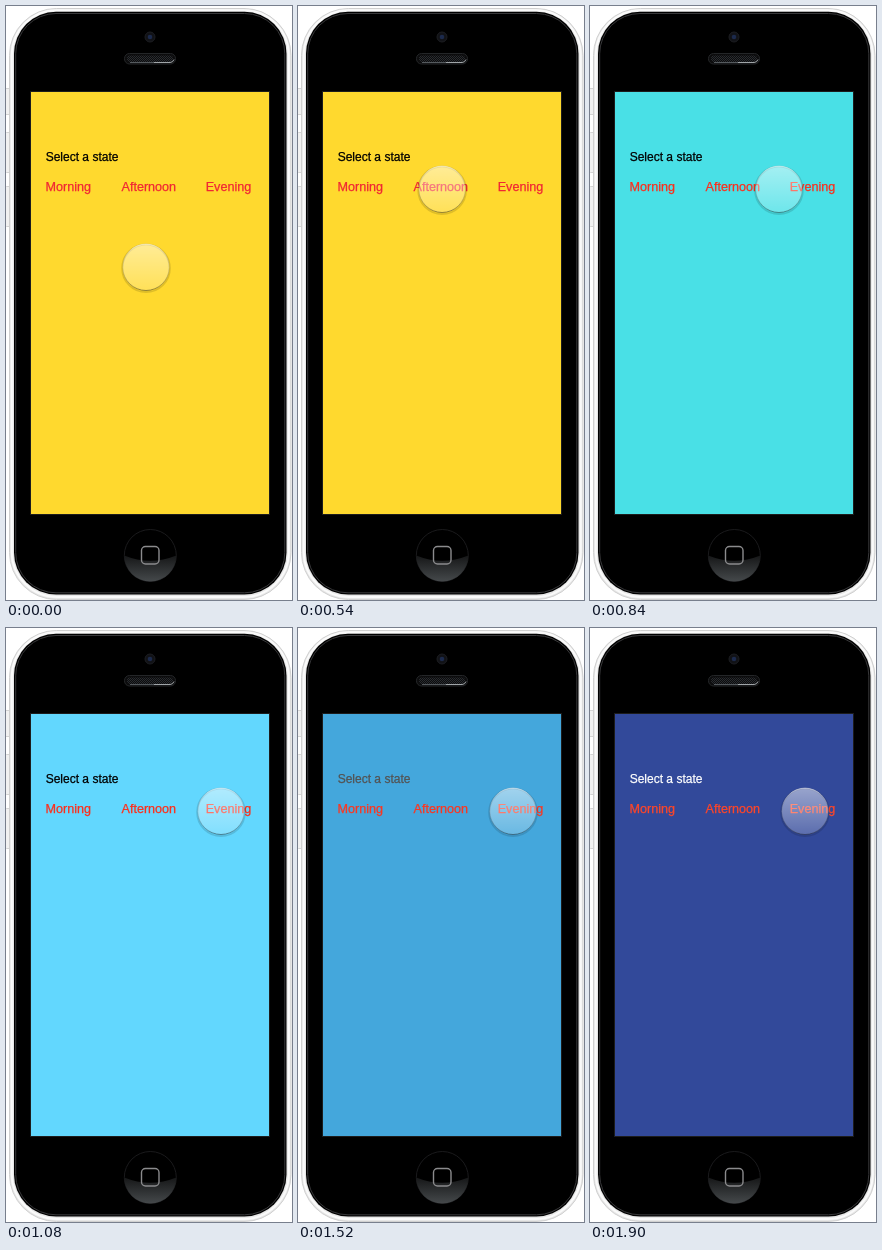
These frames come from a looping animation (286 by 594 pixels, 1.92 s). An HTML page:

```html
<!DOCTYPE html>
<html>
<head>
<meta charset="utf-8">
<style>
html, body { margin: 0; width: 100%; height: 100%; overflow: hidden; background: #fff; }
svg { display: block; width: 286px; height: 594px; }
text { font-family: "Liberation Sans", Arial, sans-serif; }
#label, #states { stroke: currentColor; fill: currentColor; stroke-width: .25px; }
</style>
</head>
<body>
<svg viewBox="0 0 286 594">
  <defs>
    <linearGradient id="glass" x2="0" y2="1">
      <stop stop-color="#fff" stop-opacity=".5"/>
      <stop offset="1" stop-color="#fff" stop-opacity=".2"/>
    </linearGradient>
    <linearGradient id="edge" x2="0" y2="1">
      <stop stop-color="#fff" stop-opacity=".5"/>
      <stop offset=".5" stop-color="#888" stop-opacity=".2"/>
      <stop offset="1" stop-color="#222" stop-opacity=".5"/>
    </linearGradient>
    <linearGradient id="gloss" x2="0" y2="1">
      <stop stop-color="#161718"/>
      <stop offset="1" stop-color="#45494b"/>
    </linearGradient>
    <pattern id="mesh" width="2" height="2" patternUnits="userSpaceOnUse">
      <path d="M0 0h1v1H0zM1 1h1v1H1z" fill="#292c30"/>
    </pattern>
  </defs>

  <g fill="#f1f1f1" stroke="#d4d4d4">
    <rect x="-1" y="82.5" width="5" height="26"/>
    <rect x="-.5" y="126.5" width="5" height="40" rx="1"/>
    <rect x="-.5" y="180.5" width="5" height="40" rx="1"/>
  </g>
  <rect x="3.5" y="2.5" width="281.5" height="591" rx="47" fill="#e6e6e6" stroke="#d0d0d0"/>
  <rect x="5.8" y="4.2" width="277" height="586.8" rx="45" fill="none" stroke="#fafafa" stroke-width="2"/>
  <rect x="8" y="5.8" width="272.5" height="582.7" rx="42"/>
  <rect x="9.7" y="7.5" width="269.1" height="579.3" rx="40.3" fill="none" stroke="#38383a"/>

  <circle cx="144" cy="31" r="5" fill="#111216" stroke="#1d1e22"/>
  <circle cx="144" cy="31" r="2.3" fill="#1c2a4c"/>
  <rect x="118.5" y="47.5" width="51" height="10.5" rx="5" fill="#0c0c0d" stroke="#242628"/>
  <rect x="121" y="49.5" width="46" height="6.5" rx="3" fill="url(#mesh)"/>
  <path d="M124 56.5h40" stroke="#555a5e"/>
  <path d="M148 56.5h16q3 0 4-3" fill="none" stroke="#a0a5a8"/>

  <circle cx="144.3" cy="549.5" r="26" stroke="#1a1a1c"/>
  <path d="M118.3 549.5Q144 560 170.3 549.5A26 26 0 0 1 118.3 549.5" fill="url(#gloss)"/>
  <rect x="135.5" y="540.5" width="17.5" height="17.5" rx="4" fill="none" stroke="#8b8b8d" stroke-width="1.4"/>

  <rect x="24.5" y="85.5" width="239" height="423" fill="none" stroke="#1c1c1c"/>
  <rect id="screen" x="25" y="86" width="238" height="422"/>
  <text id="label" x="39.7" y="155" font-size="12">Select a state</text>
  <g id="states" font-size="12.6">
    <text x="39.5" y="185">Morning</text>
    <text x="115.5" y="185">Afternoon</text>
    <text x="199.7" y="185">Evening</text>
  </g>
  <g id="touch">
    <circle cy="1" r="23.8" fill="none" stroke="#000" stroke-opacity=".13" stroke-width="2"/>
    <circle r="23.2" fill="url(#glass)" stroke="url(#edge)"/>
  </g>
</svg>
<script>
const LOOP = 1920, TAP_NOON = 540, TAP_NIGHT = 1436, FADE = 400;
// progress (one unit per state change), hue, saturation, lightness
const SKY = [
  [0, 49, 100, 59], [.68, 151, 86, 58], [.96, 182, 75, 59],
  [1, 195, 99, 69], [1.3, 200, 69, 57], [2, 227, 51, 40]
];
const el = id => document.getElementById(id);
const lerp = (a, b, p) => a + (b - a) * p;
const span = (t, from, to) => Math.min(1, Math.max(0, (t - from) / (to - from)));
const inOut = u => u < .5 ? 2 * u * u : 1 - 2 * (1 - u) ** 2;

// cubic-bezier(.25, .1, .25, 1)
function ease(x) {
  let lo = 0, hi = 1, s = .5;
  for (let i = 0; i < 20; i++) {
    s = (lo + hi) / 2;
    const bx = .75 * s * (1 - s) + s ** 3;
    if (bx < x) lo = s; else hi = s;
  }
  return .3 * s * (1 - s) ** 2 + 3 * s * s * (1 - s) + s ** 3;
}

function skyColor(q) {
  let i = 0;
  while (i < SKY.length - 2 && q > SKY[i + 1][0]) i++;
  const a = SKY[i], b = SKY[i + 1], p = span(q, a[0], b[0]);
  const [, h, s, l] = a.map((v, k) => lerp(v, b[k], p));
  return `hsl(${h} ${s}% ${l}%)`;
}

function draw(now) {
  const t = now % LOOP;
  const noon = ease(span(t, TAP_NOON, TAP_NOON + FADE));
  const night = ease(span(t, TAP_NIGHT, TAP_NIGHT + FADE));
  const rise = inOut(span(t, 0, 500)), slide = inOut(span(t, 526, 1077));
  const x = lerp(lerp(140, 144, rise), 215, slide), y = lerp(261.3, 183.3, rise);
  const grey = 255 * night;
  el("screen").style.fill = skyColor(noon + night);
  el("label").style.color = `rgb(${grey} ${grey} ${grey})`;
  el("states").style.color =
    `rgb(${lerp(240, 255, noon)} ${lerp(38, 45, noon) + 25 * night} ${lerp(52, 25, noon) + 15 * night})`;
  el("touch").setAttribute("transform", `translate(${x} ${y})`);
}

const start = performance.now();
function tick() {
  draw(performance.now() - start);
  requestAnimationFrame(tick);
}
tick();
</script>
</body>
</html>
```
